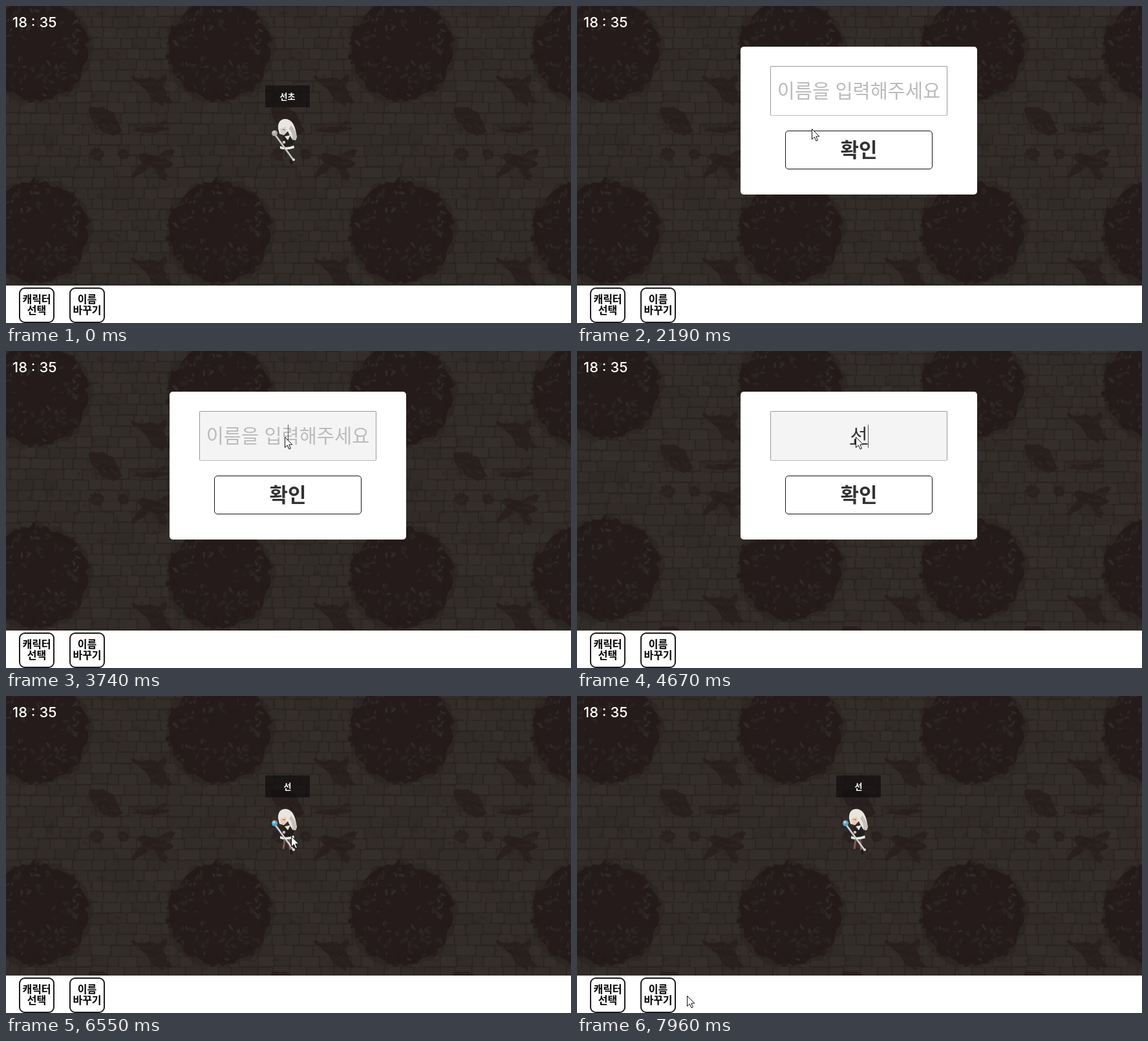
These frames come from a looping animation (874x491 px, 8030 ms). An HTML page with a canvas:

```html
<!DOCTYPE html>
<html lang="ko">
<head>
<meta charset="utf-8">
<title>이름 바꾸기</title>
<style>
html, body { margin: 0; width: 100%; height: 100%; overflow: hidden; background: #fff; }
body { position: relative; font-family: "Noto Sans CJK KR", "Noto Sans CJK", sans-serif; color: #333; }
canvas, div, svg { position: absolute; box-sizing: border-box; }
canvas { left: 0; top: 0; }
div { display: flex; align-items: center; justify-content: center; text-align: center; white-space: nowrap; }
#clock { left: 10px; top: 13px; height: 24px; font: 500 22px Inter, sans-serif; color: #fff; }
#tag { left: 401px; top: 123px; width: 69px; height: 34px; padding-bottom: 2px; background: #0f0c0ba8; color: #fff; font-size: 13px; font-weight: 700; }
.tool { top: 436px; width: 55px; height: 55px; padding-bottom: 3px; border: 2px solid #1c1c1c; border-radius: 9px; background: #fff; color: #000; font-size: 16px; font-weight: 700; line-height: 17.5px; }
#dialog { left: 253px; top: 63px; width: 366px; height: 229px; border-radius: 5px; background: #fff; }
#field { left: 46px; top: 30px; width: 274px; height: 77px; padding-bottom: 5px; border: 1px solid #999; border-bottom-color: #bbb; border-radius: 2px; font-size: 29.5px; font-weight: 500; }
#ok { left: 69px; top: 130px; width: 228px; height: 60px; padding-bottom: 5px; border: 1px solid #111; border-radius: 5px; font-size: 31px; font-weight: 700; }
#caret { top: 51px; width: 1px; height: 36px; background: #555; }
#cursor { left: 0; top: 0; overflow: visible; }
</style>
</head>
<body>
<canvas id="scene" width="874" height="433"></canvas>
<div id="clock">18 : 35</div>
<div id="tag"></div>
<div class="tool" style="left:20px">캐릭터<br>선택</div>
<div class="tool" id="rename" style="left:98px">이름<br>바꾸기</div>
<div id="dialog">
  <div id="field"><span id="typed"></span></div>
  <div id="caret"></div>
  <div id="ok">확인</div>
</div>
<svg id="cursor" width="14" height="20">
  <circle id="ring" cy="1" r="13" fill="#e8e43c" opacity=".82"/>
  <path d="M.5 .5V16.5L4.3 13 7 19 9.4 18 6.8 12H11.8Z" fill="#fff" stroke="#111"/>
</svg>
<script>
const $ = id => document.getElementById(id);
const LOOP = 8030, TILE = 282, STEP = 67;
const OPEN = 1730, CLOSE = 6550;
const ctx = $('scene').getContext('2d');

let seed = 11;
const rnd = (a = 0, b = 1) => {
  seed = (seed * 1664525 + 1013904223) % 4294967296;
  return a + (b - a) * seed / 4294967296;
};

// Repeating floor tile
function makeTile() {
  const c = document.createElement('canvas');
  c.width = c.height = TILE;
  const g = c.getContext('2d');
  const paint = (path, color) => {
    g.fillStyle = color;
    for (const dx of [-TILE, 0, TILE]) for (const dy of [-TILE, 0, TILE]) {
      g.setTransform(1, 0, 0, 1, dx, dy);
      g.fill(path);
    }
  };
  const blob = (x, y, rx, ry, rough, n, color, turn = 0) => {
    const p = new Path2D();
    for (let i = 0; i < n; i++) {
      const a = i / n * 2 * Math.PI, k = 1 + rnd(-rough, rough);
      const u = Math.cos(a) * rx * k, v = Math.sin(a) * ry * k;
      p.lineTo(x + u * Math.cos(turn) - v * Math.sin(turn), y + u * Math.sin(turn) + v * Math.cos(turn));
    }
    paint(p, color);
  };
  const shard = (x, y, len, turn, color) => blob(x, y, len, len * .5, .35, 7, color, turn);

  g.fillStyle = '#2b2522';
  g.fillRect(0, 0, TILE, TILE);
  const rows = 17, h = TILE / rows;
  for (let r = 0; r < rows; r++) {
    const start = rnd(0, 25);
    for (let x = 0; x < TILE;) {
      let w = rnd(15, 31);
      if (TILE - x - w < 14) w = TILE - x;
      const p = new Path2D(), k = rnd(-2, 2);
      p.roundRect(start + x + .8, r * h + .8 + rnd(-1, 1), w - 1.6, h - 1.6, 3);
      paint(p, `rgb(${51 + k},${45 + k},${41 + k})`);
      x += w;
    }
  }
  for (let i = 0; i < 110; i++) shard(rnd(0, TILE), rnd(0, TILE), rnd(3, 8), rnd(0, 3), i % 2 ? '#38322d60' : '#2a242170');

  // Round bush with a soft ragged rim
  const bx = 48, by = 68;
  blob(bx, by, 84, 82, .06, 50, '#2a222190');
  blob(bx, by, 78, 77, .05, 54, '#241b1a');
  for (let i = 0; i < 40; i++) {
    const a = rnd(0, 6.28), d = rnd(68, 78);
    shard(bx + d * Math.cos(a), by + d * Math.sin(a), rnd(5, 9), rnd(0, 3), '#241b1ac0');
  }
  for (let i = 0; i < 95; i++) {
    const a = rnd(0, 6.28), d = 74 * Math.sqrt(rnd(.12, 1));
    shard(bx + d * Math.cos(a), by + d * Math.sin(a), rnd(3, 6), rnd(0, 3), i % 4 ? '#2b2321' : '#312927');
  }

  // Debris: x, y, half length, half height, turn
  const dark = '#271e1dc0';
  for (const [x, y, rx, ry, turn] of [
    [232, 132, 27, 13, .75], [214, 120, 20, 5, .5], [238, 122, 18, 6, -.9],
    [150, 173, 24, 14, .3], [160, 188, 21, 11, .5],
    [225, 191, 30, 5, -.05], [238, 186, 13, 4, -.6],
    [140, 229, 11, 10, 0], [181, 230, 8, 9, 0],
    [228, 240, 28, 9, .2], [211, 250, 22, 6, -.8], [245, 232, 17, 6, -.5], [238, 256, 17, 6, .9]
  ]) {
    blob(x, y, rx, ry, .22, 18, dark, turn);
    for (let i = 0; i < 3; i++) shard(x + rnd(-rx, rx) * .5, y + rnd(-ry, ry) * .5, 5, turn, '#2f2623a0');
  }
  return c;
}
const floor = ctx.createPattern(makeTile(), 'repeat');

function shape(d, color) {
  ctx.fillStyle = color;
  ctx.fill(new Path2D(d));
}
function line(x1, y1, x2, y2, w, color) {
  ctx.strokeStyle = color;
  ctx.lineWidth = w;
  ctx.beginPath();
  ctx.moveTo(x1, y1);
  ctx.lineTo(x2, y2);
  ctx.stroke();
}
function dot(x, y, r, color) {
  ctx.fillStyle = color;
  ctx.beginPath();
  ctx.arc(x, y, r, 0, 7);
  ctx.fill();
}

function hero(nod, vivid) {
  const pick = (a, b) => vivid ? a : b;
  line(431, 222, 429, 237, 3, pick('#80594a', '#352e2b'));
  line(438, 222, 440, 242, 3, pick('#80594a', '#352e2b'));
  line(440, 238, 442, 245, 4, '#211a1a');
  shape('M429 202L440 199 446 207 443 220 427 220Z', '#202020');
  shape('M424 217Q434 221 445 216L446 220Q435 224 424 221Z', '#eeece8');
  if (nod) {
    shape('M420 205L424 191Q429 181 440 180C450 179 455 186 453 192Q451 199 443 201L436 198 428 206Z', '#e9e2d8');
    shape('M420 205L424 194 434 193 437 198 428 206Z', '#c9c0b8');
    shape('M427 189L438 183 441 187 436 193 429 194Z', '#e3bda4');
    line(431, 189, 437, 186, 1.2, '#a05c50');
  } else {
    shape('M431 202L440 200 436 208Z', '#e9e5df');
    shape('M421 190C420 179 426 174 433 175C444 176 448 188 450 203L448 208 443 207Q438 199 436 194L430 200 423 198Z', '#e9e5df');
    shape('M438 190Q444 197 443 207L448 208 450 203Q447 191 441 185Z', pick('#c9c0b8', '#bdbab7'));
    shape('M424 190L433 187 434 195 429 200 425 197Z', pick('#ecc9b2', '#d4cfca'));
    line(428, 191, 432, 192, 1.2, pick('#a05c50', '#6e6763'));
  }
  line(416, 199, 445, 239, 2.6, pick('#dfe3e8', '#d5d3d0'));
  line(417, 202, 444, 239, 1, '#99969a');
  dot(415.5, 197, 4.5, pick('#5ba6c9', '#aaa8a6'));
  dot(414.5, 195.5, 2, pick('#a8d7e6', '#cfcdcb'));
  dot(430, 211, 2.3, pick('#dfb49c', '#cfcac5'));
  dot(445, 238, 2, '#e4e1de');
}

// Cursor stops: time, x, y
const stops = [
  [720, 124, 490], [920, 126, 474], [1360, 126, 474], [1380, 127, 474], [1925, 127, 474],
  [2194, 363, 190], [2400, 425, 145], [2600, 431, 133], [5860, 431, 133], [6150, 441, 217],
  [6620, 441, 217], [6880, 400, 120], [7085, 371, 73], [7230, 460, 68], [7430, 553, 190],
  [7690, 300, 437], [7820, 213, 468], [7956, 170, 464]
];
function cursorAt(t) {
  const i = stops.findIndex(s => s[0] > t);
  if (i < 0) return stops[stops.length - 1].slice(1);
  const a = stops[Math.max(0, i - 1)], b = stops[i];
  const k = Math.max(0, (t - a[0]) / (b[0] - a[0]));
  return [a[1] + (b[1] - a[1]) * k, a[2] + (b[2] - a[2]) * k];
}

const within = (t, a, b) => t >= a && t < b;

function draw(t) {
  const q = 720 + STEP * Math.floor((t - 712) / STEP);
  const lift = t < 4610 ? 0 : t < 4670 ? 6 : 12;
  ctx.save();
  ctx.translate(0, -lift);
  ctx.fillStyle = floor;
  ctx.fillRect(0, 0, 874, 446);
  ctx.restore();
  hero(within(t, 6880, 7290), t > OPEN);
  $('tag').textContent = t < CLOSE ? '선초' : '선';

  const empty = t < 4340;
  $('dialog').style.display = within(t, OPEN, CLOSE) ? 'flex' : 'none';
  $('rename').style.background = within(t, 1590, OPEN) ? '#d9d9d9' : '#fff';
  $('field').style.background = t < 2400 ? '#fff' : t < 6350 ? '#f4f4f4' : t < 6480 ? '#fcfcfc' : '#fff';
  $('ok').style.background = t >= 6350 ? '#d9d9d9' : '#fff';

  const typed = $('typed');
  typed.textContent = empty ? '이름을 입력해주세요' : t < 4400 ? 'ㅅ' : t < 4470 ? '서' : '선';
  typed.style.color = empty ? '#bbb' : '#333';
  typed.style.textDecoration = !empty && t < 6350 ? 'underline 2px' : 'none';
  const caret = within(t, 2800, 3140) || within(t, 3740, 5200) || within(t, 5730, 6350);
  $('caret').style.display = caret ? 'block' : 'none';
  $('caret').style.left = (empty ? 183 : 197) + 'px';

  const [x, y] = cursorAt(q);
  $('cursor').style.transform = `translate(${Math.round(x)}px,${Math.round(y)}px)`;
  $('cursor').style.display = t >= 720 ? 'block' : 'none';
  const press = within(t, 1590, 1800) || within(t, 2530, 2730) || within(t, 6350, CLOSE);
  $('ring').style.display = press ? 'block' : 'none';
}

const began = performance.now();
function tick() {
  draw((performance.now() - began) % LOOP);
  requestAnimationFrame(tick);
}
tick();
</script>
</body>
</html>
```
